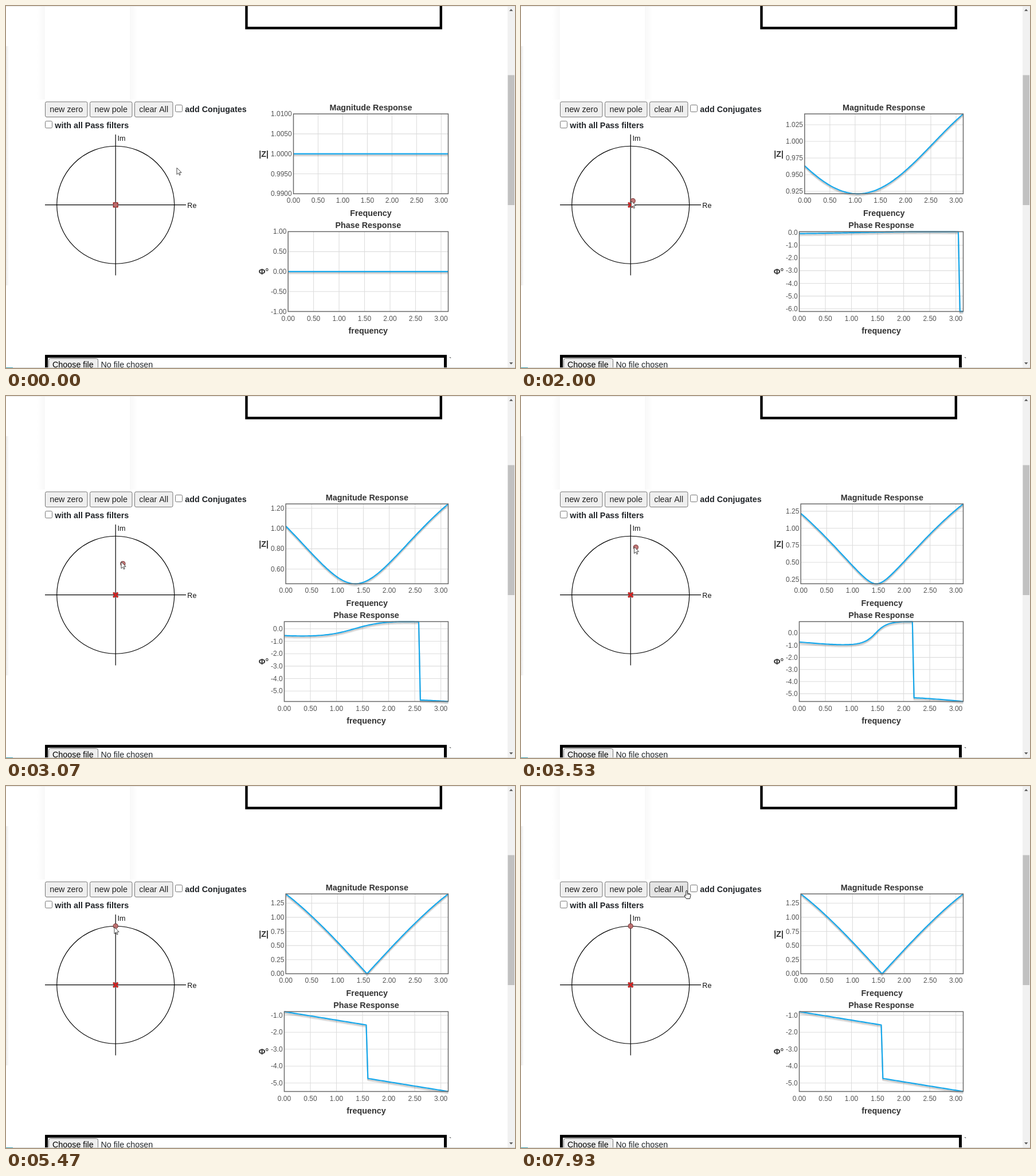
Write an HTML page with a canvas that moves like this. It is 888 px wide and 631 px high and loops after 8000 ms.

```html
<!DOCTYPE html>
<html lang="en">
<head>
<meta charset="utf-8">
<title>Pole-zero editor</title>
<style>
  html, body { margin: 0; width: 100%; height: 100%; overflow: hidden; background: #fff; }
  canvas { display: block; }
</style>
</head>
<body>
<canvas id="stage" width="888" height="631"></canvas>
<script>
const ctx = document.getElementById('stage').getContext('2d');
const LOOP = 8000, TICK = 1000 / 15;
const FONT = '"Liberation Sans", Arial, sans-serif';
const CENTER = { x: 191.2, y: 346.7, r: 102.5 };
const SAMPLES = 100;

// Keyframes: [tick, x, y]; the zero is given in pixels from the centre, y up.
const ZERO_PATH = [
  [25, 0, 0], [26, 1, 1.5], [30, 4, 7], [36, 6.1, 15.5], [37, 6.6, 18],
  [46, 12.7, 54.4], [50, 11.5, 74], [57, 6, 95], [60, 4.5, 97.5], [63, 2.95, 99.7],
  [69, 2.95, 99.7], [78, 0.3, 102.2], [80, 0.3, 102.2], [82, 0, 102.5]
];
const POINTER_PATH = [
  [0, 298, 282], [5, 245, 316], [11, 188, 346.5], [13, 187, 347], [17, 187, 348],
  [24, 187, 348], [25, 190, 346], [36, 195, 332], [46, 201, 289], [50, 200, 271],
  [57, 194, 252], [63, 192, 249], [69, 192, 249], [78, 189, 246.5], [82, 189, 246],
  [110, 189, 246], [115, 202, 192], [119, 289, 182]
];
const BUTTONS = [
  { label: 'new zero', x: 68, w: 74.5 },
  { label: 'new pole', x: 146, w: 74.5 },
  { label: 'clear All', x: 224, w: 67.5 }
];

function along(path, k) {
  if (k <= path[0][0]) return path[0].slice(1);
  for (let i = 1; i < path.length; i++) {
    const [k0, x0, y0] = path[i - 1], [k1, x1, y1] = path[i];
    if (k <= k1) {
      const u = (k - k0) / (k1 - k0);
      return [x0 + (x1 - x0) * u, y0 + (y1 - y0) * u];
    }
  }
  return path[path.length - 1].slice(1);
}

function text(str, x, y, { size = 14.33, bold = false, color = '#212529', align = 'left' } = {}) {
  ctx.font = `${bold ? 'bold ' : ''}${size}px ${FONT}`;
  ctx.fillStyle = color;
  ctx.textAlign = align;
  ctx.fillText(str, x, y);
}

function rect(x, y, w, h, color) {
  ctx.fillStyle = color;
  ctx.fillRect(x, y, w, h);
}

function roundBox(x, y, w, h, r, fill, stroke) {
  ctx.beginPath();
  ctx.roundRect(x, y, w, h, r);
  ctx.fillStyle = fill;
  ctx.fill();
  ctx.strokeStyle = stroke;
  ctx.lineWidth = 1;
  ctx.stroke();
}

function stroke(points, color, width) {
  ctx.beginPath();
  points.forEach(([x, y]) => ctx.lineTo(x, y));
  ctx.strokeStyle = color;
  ctx.lineWidth = width;
  ctx.stroke();
}

function fade(x, y, w, h, from, to) {
  const g = ctx.createLinearGradient(x, 0, x + w, 0);
  g.addColorStop(0, from);
  g.addColorStop(1, to);
  rect(x, y, w, h, g);
}

function polygon(points, fill, outline, width) {
  ctx.beginPath();
  points.forEach(([x, y]) => ctx.lineTo(x, y));
  ctx.closePath();
  ctx.fillStyle = fill;
  ctx.fill();
  ctx.strokeStyle = outline;
  ctx.lineWidth = width;
  ctx.stroke();
}

function drawPage() {
  rect(0, 0, 888, 631, '#fff');
  rect(0, 0, 888, 1, '#e6e6e6');

  // Card and side panel shadows
  fade(54, 1, 14, 162, '#fff', '#f8f8f8');
  fade(216, 1, 14, 162, '#f8f8f8', '#fff');
  fade(0, 70, 5, 417, '#e9e9e9', '#fff');

  ctx.strokeStyle = '#000';
  ctx.lineWidth = 4.4;
  ctx.strokeRect(419.5, -10, 339.3, 48.4);
  ctx.lineWidth = 5;
  ctx.strokeRect(70.5, 610.6, 696, 60);
  roundBox(74.5, 614.5, 86, 30, 3, '#efefef', '#767676');
  text('Choose file', 81, 629.5, { color: '#000' });
  text('No file chosen', 165.5, 629.5);
  text('`', 773, 622, { size: 13 });

  // Scrollbar
  rect(875, 1, 13, 630, '#f1f1f1');
  rect(875.5, 120.5, 11.5, 226.5, '#c1c1c1');
  polygon([[878.5, 8.5], [884, 8.5], [881.2, 5.5]], '#505050', '#505050', 0.4);
  polygon([[878.5, 621.5], [884, 621.5], [881.2, 624.5]], '#505050', '#505050', 0.4);
  rect(0, 630, 888, 1, '#d0d3d4');
  rect(0, 630, 12, 1, '#3a9bab');
}

function overButton(b, [x, y]) {
  return x >= b.x && x <= b.x + b.w && y >= 167 && y <= 194;
}

function drawControls(pointer) {
  for (const b of BUTTONS) {
    const hot = overButton(b, pointer);
    roundBox(b.x + 0.5, 167, b.w - 1, 26.5, 2.5, hot ? '#e4e4e4' : '#efefef', hot ? '#4f4f4f' : '#767676');
    text(b.label, b.x + b.w / 2, 185.4, { color: '#222', align: 'center' });
  }
  roundBox(295.5, 172.5, 12, 12, 2, '#fff', '#767676');
  text('add Conjugates', 312.3, 185.4, { bold: true });
  roundBox(68.5, 200.7, 12, 12, 2, '#fff', '#767676');
  text('with all Pass filters', 85.3, 213.4, { bold: true });
}

function drawPlane(zx, zy) {
  const { x, y, r } = CENTER;
  ctx.beginPath();
  ctx.arc(x, y, r, 0, Math.PI * 2);
  ctx.strokeStyle = '#000';
  ctx.lineWidth = 1.15;
  ctx.stroke();
  stroke([[68, y], [314, y]], '#000', 1.2);
  stroke([[x, 224], [x, 469.5]], '#000', 1.2);
  text('Im', 194.5, 234.6, { size: 12.6, color: '#111' });
  text('Re', 316.3, 352, { size: 12.6, color: '#111' });

  for (const [color, width] of [['#8a3a35', 3.6], ['#dd2222', 2.3]]) {
    stroke([[x - 4, y - 4], [x + 4, y + 4]], color, width);
    stroke([[x - 4, y + 4], [x + 4, y - 4]], color, width);
  }
  ctx.beginPath();
  ctx.arc(x + zx, y - zy, 4.1, 0, Math.PI * 2);
  ctx.fillStyle = 'rgba(192,112,112,0.94)';
  ctx.fill();
  ctx.strokeStyle = '#703030';
  ctx.lineWidth = 1;
  ctx.stroke();
}

// Response of (e^jw - z) / e^jw over 0..pi
function response(a, b) {
  const mag = [], phase = [];
  for (let i = 0; i <= SAMPLES; i++) {
    const w = Math.PI * i / SAMPLES;
    const re = Math.cos(w) - a, im = Math.sin(w) - b;
    mag.push(Math.hypot(re, im));
    phase.push(Math.atan2(im, re) - w);
  }
  return { mag, phase };
}

function ticks(min, max) {
  const delta = (max - min) / 5;
  const magn = 10 ** Math.floor(Math.log10(delta));
  const norm = delta / magn;
  const size = magn * (norm < 1.5 ? 1 : norm < 2.25 ? 2 : norm < 3 ? 2.5 : norm < 7.5 ? 5 : 10);
  const decimals = Math.max(0, 1 - Math.floor(Math.log10(size) + 1e-9));
  const list = [];
  for (let i = Math.ceil(min / size - 1e-6); i * size <= max + size * 1e-6; i++) {
    const value = i * size || 0;
    list.push({ value, label: value.toFixed(decimals) });
  }
  return list;
}

function drawChart(data, top, title, xTitle, yTitle) {
  const height = 139.2, right = 771.5, bottom = top + height;
  let min = Math.min(...data), max = Math.max(...data);
  if (max - min < 1e-9) {
    const mid = Math.round(max);
    const widen = mid === 0 ? 1 : 0.01;
    min = mid - widen;
    max = mid + widen;
  }
  const yTicks = ticks(min, max), xTicks = ticks(0, Math.PI);
  ctx.font = `12px ${FONT}`;
  const left = 464.8 + Math.max(...yTicks.map(t => ctx.measureText(t.label).width));
  const px = w => left + (right - left) * w / Math.PI;
  const py = v => bottom - height * (v - min) / (max - min);
  const small = { size: 12, color: '#545454' };
  const heading = { size: 14.33, bold: true, color: '#333', align: 'center' };
  const middle = (left + right) / 2;

  for (const t of xTicks) {
    const x = px(t.value);
    if (t.value > 0) stroke([[x, top], [x, bottom]], '#dddddd', 1.1);
    text(t.label, x, bottom + 16, { ...small, align: 'center' });
  }
  for (const t of yTicks) {
    const y = py(t.value);
    if (y > top + 0.5 && y < bottom - 0.5) stroke([[left, y], [right, y]], '#dddddd', 1.1);
    text(t.label, left - 2.8, y + 4.1, { ...small, align: 'right' });
  }

  const line = dy => data.map((v, i) => [px(Math.PI * i / SAMPLES), py(v) + dy]);
  ctx.lineJoin = 'round';
  stroke(line(3.8), 'rgba(0,0,0,0.1)', 2);
  stroke(line(2), 'rgba(0,0,0,0.2)', 2);
  stroke(line(0), '#16a8ec', 2.2);
  ctx.lineJoin = 'miter';

  ctx.strokeStyle = '#6a6a6a';
  ctx.lineWidth = 1.5;
  ctx.strokeRect(left, top, right - left, height);

  text(title, middle, top - 6.2, heading);
  text(xTitle, middle, bottom + 38.4, heading);
  text(yTitle, 449.6, top + 74.8, heading);
}

function drawArrow() {
  polygon([[0, 0], [0, 11.6], [2.7, 9], [4.5, 13], [6.2, 12.2], [4.5, 8.3], [8.1, 8.3]],
    '#fff', '#333', 0.9);
}

function drawHand() {
  ctx.beginPath();
  ctx.moveTo(-1.2, 9);
  ctx.lineTo(-1.2, 1);
  ctx.quadraticCurveTo(0, -1, 1.2, 1);
  ctx.lineTo(1.2, 5);
  ctx.lineTo(6, 6.3);
  ctx.quadraticCurveTo(7.3, 6.8, 7, 8.5);
  ctx.lineTo(5.6, 14.5);
  ctx.lineTo(-0.6, 14.5);
  ctx.lineTo(-4, 9.2);
  ctx.quadraticCurveTo(-3.6, 7, -1.2, 9);
  ctx.closePath();
  ctx.fillStyle = '#fff';
  ctx.fill();
  ctx.strokeStyle = '#222';
  ctx.lineWidth = 1;
  ctx.stroke();
  for (const x of [1.3, 3.2, 5]) stroke([[x, 5.2], [x, 8]], '#222', 0.7);
}

function draw(time) {
  const k = Math.floor((time % LOOP) / TICK + 0.1);
  const [zx, zy] = along(ZERO_PATH, k);
  const pointer = along(POINTER_PATH, k);
  const { mag, phase } = response(zx / CENTER.r, zy / CENTER.r);

  drawPage();
  drawControls(pointer);
  drawPlane(zx, zy);
  drawChart(mag, 188.1, 'Magnitude Response', 'Frequency', '|Z|');
  drawChart(phase, 393.3, 'Phase Response', 'frequency', 'Φ°');

  ctx.save();
  ctx.translate(...pointer);
  if (BUTTONS.some(b => overButton(b, pointer))) drawHand();
  else drawArrow();
  ctx.restore();
}

let start;
function loop(now) {
  start ??= now;
  draw(now - start);
  requestAnimationFrame(loop);
}
draw(0);
requestAnimationFrame(loop);
</script>
</body>
</html>
```
